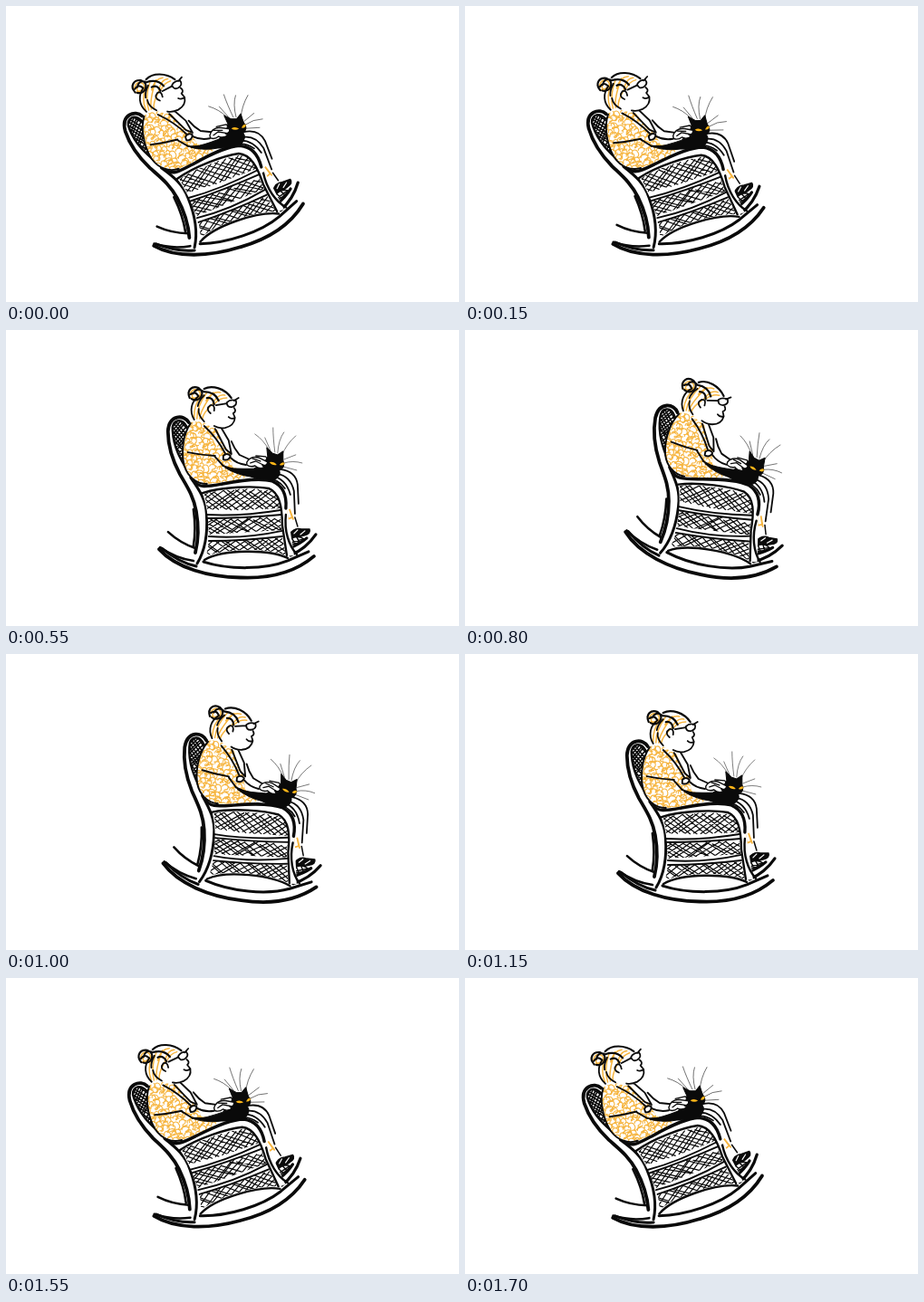
An HTML page that plays this animation: 500x327 px, repeating every 1.75 s.

```html
<!DOCTYPE html>
<html>
<head>
<meta charset="utf-8">
<style>
html, body { margin: 0; height: 100%; overflow: hidden; background: #fff; }
svg { display: block; width: 100%; height: 100%; }
.line { fill: none; stroke: #0a0a0a; stroke-linecap: round; stroke-linejoin: round; }
.gold { fill: none; stroke: #f6b540; stroke-linecap: round; }
.white { fill: #fff; }
.ink { fill: #0a0a0a; }
</style>
</head>
<body>
<svg viewBox="0 0 500 327">
  <defs>
    <clipPath id="dressShape"><path d="M204 102C196 114 193 134 197 150C201 163 211 170 222 170L256 167L271 159L250 151L248 138L238 122L232 106L219 100Z"/></clipPath>
    <clipPath id="wickerShape">
      <path d="M219 181C240 175 275 174 291 177Q302 182 304 197L223 201Z"/>
      <path d="M223 209L303 205L304 221L224 226Z"/>
      <path d="M224 234L305 229L309 249C290 241 242 241 221 250Z"/>
    </clipPath>
    <clipPath id="backShape"><path d="M184 111C182 101 191 96 197 103L202 108C196 121 194 135 198 149Q186 132 184 111Z"/></clipPath>
  </defs>

  <g id="rocker">
    <!-- far rocker and back leg -->
    <g class="line" stroke-width="2.6">
      <path d="M179 223Q192 235 209 241M170 240Q187 252 207 255M207 198Q210 220 207 238"/>
      <path stroke-width="3.2" d="M314 249Q331 242 342 226M313 241Q324 237 332 230"/>
    </g>

    <!-- legs and shoes -->
    <g class="gold" stroke-width="1.8"><path d="M309 197L311 209L316 207L313 198L317 209"/></g>
    <g class="line" stroke-width="1.5">
      <path d="M309 210L311 222M319 207L322 217"/>
      <path class="ink" d="M313 226Q318 218 326 220L335 220Q337 225 329 227L315 232Z"/>
      <path class="white" d="M312 234Q317 227 325 229L329 231Q322 237 312 237Z"/>
      <path stroke="#fff" stroke-width="1.2" d="M318 225L322 221M325 226L330 222"/>
      <path d="M316 231L319 236M321 229L324 235M312 236L328 231"/>
    </g>

    <!-- chair back -->
    <g clip-path="url(#backShape)"><g id="backWeave" class="line" stroke-width="1.6"></g></g>
    <g class="line">
      <path stroke-width="3.8" d="M202 102C197 93 180 93 179 112C179 128 184 144 192 159C200 173 207 183 210 200C213 217 212 234 209 246"/>
      <path stroke-width="2.3" d="M200 107C194 96 183 99 184 111C185 130 193 143 202 158"/>
      <path stroke-width="3" d="M204 163C214 177 221 188 221.500 204C223 227 220 243 211 258"/>
    </g>

    <!-- dress -->
    <path class="white" d="M204 102C196 114 193 134 197 150C201 163 211 170 222 170L256 167L271 159L250 151L248 138L238 122L232 106L219 100Z"/>
    <g clip-path="url(#dressShape)"><g id="scribble" class="gold" stroke-width="1.1"></g></g>
    <g class="line" stroke-width="1.9">
      <path d="M204 103C196 114 193 134 197 150C201 163 211 170 222 170"/>
      <path d="M201 135Q215 138 231 139M219 106Q233 119 242 136M236 105L246 122L249 137L243 132L231 109M249 123Q252 131 258 138L269 143M231 140L240 150"/>
      <path d="M240 150Q257 156 269 158M248 141Q255 148 265 149"/>
      <path class="white" d="M240 139Q244 135 248 139Q246 145 240 143Z"/>
    </g>

    <!-- head -->
    <g class="line" stroke-width="1.8">
      <path class="white" stroke="none" d="M208 99C202 87 205 71 218 66C231 61 245 67 249 76L254 82L252 95Q253 106 241 109L228 108L216 100Z"/>
      <g class="gold" stroke-width="1.5">
        <path d="M208 97Q207 83 217 71M211 98Q211 84 222 69M214 98Q215 88 229 69M217 98Q218 92 226 84M221 78Q228 67 237 69M228 82Q234 70 242 72M231 81Q236 75 244 75"/>
        <path d="M203 71Q208 62 214 68Q217 75 209 76Q203 74 208 69M204 75Q211 76 214 72"/>
      </g>
      <path d="M208 99C202 89 205 79 213 73M219 101Q212 94 213 87M212 84Q213 78 219 72"/>
      <path stroke-width="2.2" d="M203 75C199 66 206 61 213 64C222 70 213 81 205 76M207 70Q211 63 217 67M204 71Q209 67 212 72"/>
      <path stroke-width="2.2" d="M219 65C228 60 242 65 249 75M218 68Q231 68 235 78M222 75Q229 74 230 82"/>
      <path d="M226 92Q220 87 226 83Q231 82 230 89"/>
      <path d="M232 83L244 81M244 80Q248 76 254 78Q256 83 250 85Q244 86 244 80M252 78L257 75"/>
      <path d="M252 86Q255 90 251 92L253 97Q252 106 242 108Q235 109 230 106M246 96Q249 99 253 97"/>
    </g>

    <!-- side of the chair -->
    <path class="white" d="M216 176C242 166 282 163 298 170Q310 181 310 197L318 249L221 257Q227 220 220 190Z"/>
    <g clip-path="url(#wickerShape)"><g id="sideWeave" class="line" stroke-width="1.2"></g></g>
    <g class="line">
      <path stroke-width="3.4" d="M207 166C213 175 222 173 239 170C260 166 280 163 294 167C308 173 310 185 309 197"/>
      <path stroke-width="2.4" d="M217 180C239 173 274 172 290 175C302 180 305 195 305 216L310 249"/>
      <path stroke-width="2.4" d="M309 204C307 222 312 238 321 248"/>
      <path stroke-width="1.9" d="M222 204Q260 206 303 199M223 208Q262 208 304 204M224 228Q263 231 305 222M224 233Q262 233 305 228"/>
      <path stroke-width="2.4" d="M219 254C239 242 290 242 311 252"/>
    </g>

    <!-- near rocker -->
    <g class="line">
      <path stroke-width="3.8" d="M169 242C188 263 224 273 259 273.500C293 275 320 267 340 250"/>
      <path stroke-width="3" d="M172 241C184 251 197 258 210 261M218 256C246 265 286 265 311 255L334 245"/>
    </g>

    <!-- knees, cat and hands -->
    <g class="line" stroke-width="1.8">
      <path class="white" stroke="none" d="M283 163Q296 150 315 158Q324 166 322 181L312 184Q308 170 295 166Z"/>
      <path d="M303 154Q320 156 322 171L323 192M299 159Q314 161 318 178L319 203M293 161Q309 164 314 182M286 164Q300 164 308 175"/>
      <path class="ink" stroke-width="1" d="M242 152Q257 154 274 153L285 147L289 140L288 130L294 136L300 138L306 134L306 144Q309 152 302 155Q304 161 296 166Q283 167 270 162Q255 160 242 152Z"/>
      <path class="white" stroke-width="1.4" d="M266 146Q270 139 279 141L289 146Q288 151 283 149L285 152Q279 154 275 150Q270 152 266 149Z"/>
      <path stroke-width="1.3" d="M270 147L276 145L284 149M272 142L281 145M276 139L287 140L291 147"/>
      <path fill="#ffb719" stroke="none" d="M291 146Q296 145 299 149Q294 150 291 146ZM302 149Q305 145 308 147Q306 151 302 149Z"/>
    </g>
    <g class="line" stroke-width=".7" opacity=".75">
      <path d="M290 132Q285 122 275 115M292 133L286 119M297 135Q295 119 295 108M300 136Q301 121 307 113M305 138Q309 127 320 117M307 143L320 138M307 147Q317 144 327 147M306 151L321 155"/>
    </g>
  </g>
</svg>

<script>
const FRAME_MS = 50, FRAMES = 35, TURN = 17;
const rocker = document.getElementById('rocker');

let seed = 7;
const random = () => (seed = seed * 16807 % 2147483647) / 2147483647;
const jitter = size => (random() - 0.5) * size;

function addPath(id, d) {
  const path = document.createElementNS('http://www.w3.org/2000/svg', 'path');
  path.setAttribute('d', d);
  document.getElementById(id).append(path);
}

// Loose cross-hatching over a box; the strokes end unevenly.
function weave(id, left, top, right, bottom, gap, slope, rough) {
  const run = (bottom - top) * slope;
  let d = '';
  for (let x = left - run; x < right + run; x += gap) {
    const high = () => top + random() * rough, low = () => bottom - random() * rough;
    d += `M${x + jitter(rough)} ${high()}L${x + run + jitter(rough)} ${low()}`;
    d += `M${x + jitter(rough)} ${low()}L${x + run + jitter(rough)} ${high()}`;
  }
  addPath(id, d);
}

// Curly pen loops covering the dress.
function scribble() {
  let d = '';
  for (let y = 104; y < 174; y += 6) {
    for (let x = 196; x < 272; x += 6.5) {
      const cx = x + jitter(4), cy = y + jitter(4), r = 2.6 + random() * 1.8;
      d += `M${cx - r} ${cy}a${r} ${r * 0.8} ${random() * 90} 1 1 ${r} ${r}q${jitter(6)} ${jitter(6)} ${r + 1} ${jitter(5)}`;
    }
  }
  addPath('scribble', d);
}

weave('sideWeave', 218, 175, 310, 200, 8, 1.2, 4);
weave('sideWeave', 218, 206, 310, 226, 8, 1.3, 4);
weave('sideWeave', 218, 229, 310, 250, 8, 1.2, 4);
weave('backWeave', 180, 95, 206, 150, 4, 0.8, 2);
scribble();

// Starts gently from the leaning pose, then swings at a steady rate.
function swingAngle(step) {
  const speed = 2.07, ramp = 4.3;
  const travelled = step < ramp ? speed * step * step / (2 * ramp) : speed * (step - ramp / 2);
  return travelled - 18.4;
}

function draw(now) {
  const frame = Math.floor(now / FRAME_MS) % FRAMES;
  const angle = swingAngle(TURN - Math.abs(TURN - frame));
  const dx = 1.345 * angle + 0.0045 * angle * angle;
  const dy = -0.225 * angle - 0.014 * angle * angle;
  rocker.setAttribute('transform', `translate(${dx} ${dy}) rotate(${angle} 250 200)`);
  requestAnimationFrame(draw);
}
draw(0);
</script>
</body>
</html>
```
